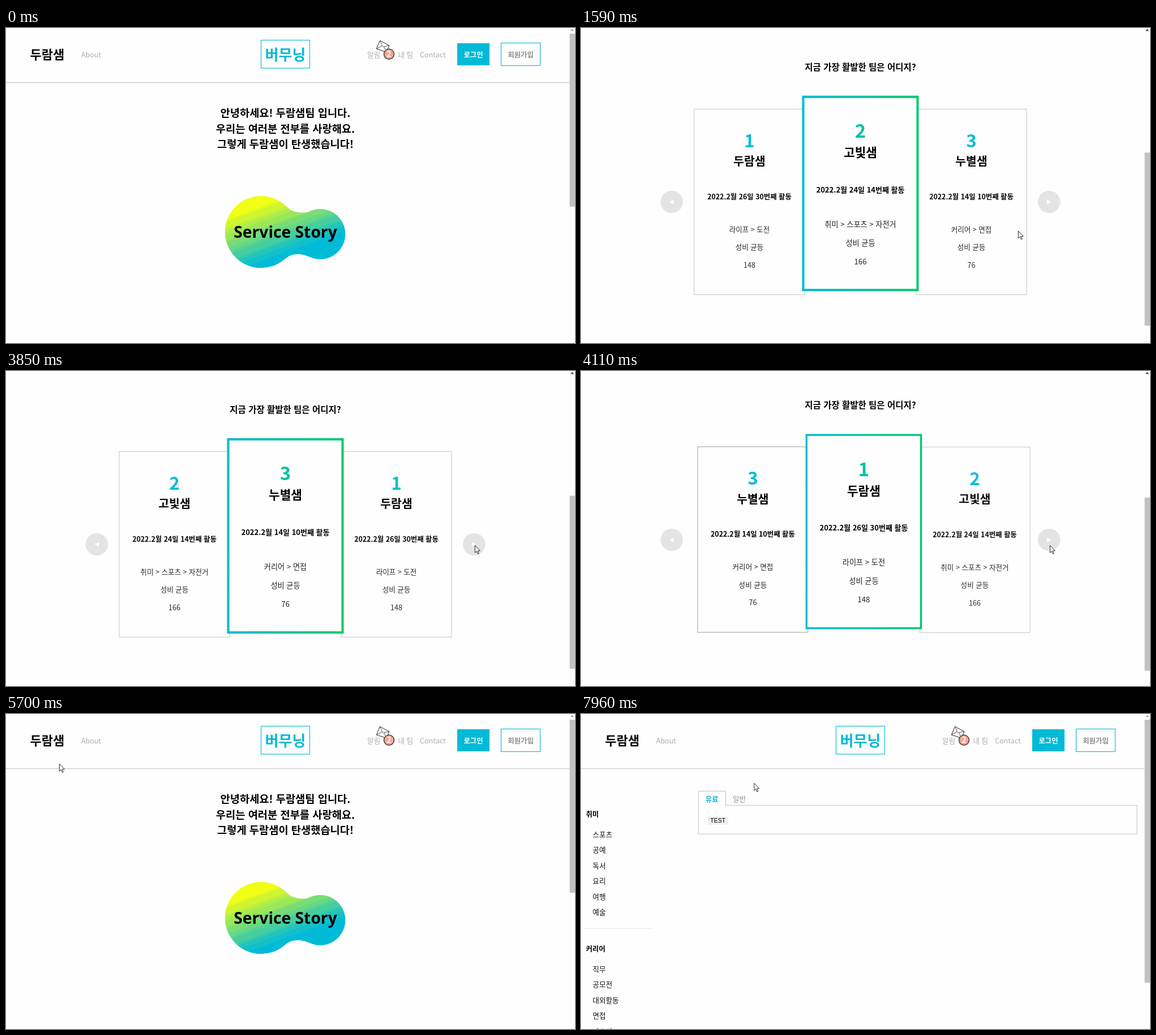
Write an HTML page that moves like this. It is 1005 by 557 pixels and loops after 8 s.

```html
<!DOCTYPE html>
<html lang="ko">
<head>
<meta charset="utf-8">
<title>Team service</title>
<style>
  html, body { margin: 0; width: 100%; height: 100%; overflow: hidden; background: #fefefe; }
  svg { display: block; width: 100%; height: 100%; }
  text { font-family: "Noto Sans CJK KR", "Noto Sans CJK JP", "Noto Sans CJK", sans-serif; white-space: pre; }
  .b { font-weight: 700; }
  .story { font-family: "Noto Sans", "Open Sans", sans-serif; font-weight: 700; }
  .chip { font-family: "Liberation Sans", Arial, sans-serif; }
</style>
</head>
<body>
<svg id="stage" viewBox="0 0 1005 557" xmlns="http://www.w3.org/2000/svg"></svg>
<script>
const LOOP = 8000, STEP = 132.6;
const CYAN = '#00bad6', GREEN = '#00c96b', PAPER = '#fefefe', GREY = '#c2c2c2', MUTED = '#adadad';
const BODY = 12.56, STRONG = 12.4;
const MID = 493.5, PITCH = 196, CARD_W = 196.2, CARD_H = 329.2, CARD_Y = 830.5;

const BRAND = '두람샘', LINK = '버무닝';
const TEAMS = [
  { rank: 1, name: BRAND, date: '2022.2월 26일 30번째 활동', topic: '라이프 > 도전', score: 148 },
  { rank: 2, name: '고빛샘', date: '2022.2월 24일 14번째 활동', topic: '취미 > 스포츠 > 자전거', score: 166 },
  { rank: 3, name: '누별샘', date: '2022.2월 14일 10번째 활동', topic: '커리어 > 면접', score: 76 }
];

// Each move runs from one time to another and ends at the given value.
const SCROLLS = [[800, 1190, 131], [1330, 1590, 523], [3780, 4100, 532], [4293, 4640, 262], [4780, 5300, 0]];
const SLIDES = [2585.5, 3877], SLIDE_TIME = 300;
const APPEAR = 390, OPEN_LIST = 7550;
const POINTER_START = [791, 369];
const POINTER = [
  [398, 930, 772, 358.5], [1860, 1985, 773, 355], [1990, 2250, 804, 299], [2250, 2515, 828, 308],
  [4780, 5300, 332, 230], [5300, 5700, 94, 88], [5700, 5960, 81, 60],
  [6100, 6880, 477, 107], [7030, 7410, 504, 29], [7430, 7550, 504, 38], [7830, 7950, 305.5, 122]
];
const HAND = [[2500, 3840], [5960, 6230], [7290, 7950]];

const clamp = v => Math.min(1, Math.max(0, v));
const linear = u => u;
const smooth = u => u * u * (3 - 2 * u);

function ease(u) {
  const curve = (s, a, b) => 3 * (1 - s) ** 2 * s * a + 3 * (1 - s) * s * s * b + s ** 3;
  let lo = 0, hi = 1;
  for (let i = 0; i < 24; i++) {
    const s = (lo + hi) / 2;
    if (curve(s, .25, .25) < u) lo = s; else hi = s;
  }
  return curve(lo, .1, 1);
}

const follow = (moves, start, t, easing) => moves.reduce((now, [from, to, ...end]) => {
  const k = easing(clamp((t - from) / (to - from)));
  return now.map((v, i) => v + (end[i] - v) * k);
}, start);

// Text is placed by the middle of its letters.
const text = (str, x, cy, size, { fill = '#000', anchor = 'middle', cls = '' } = {}) =>
  `<text x="${x}" y="${(cy + size * .37).toFixed(2)}" font-size="${size}" fill="${fill}" text-anchor="${anchor}" class="${cls}">${
    String(str).replace(/>/g, '&gt;')}</text>`;
const box = (x, y, w, h, fill, stroke = 'none', sw = 1) =>
  `<rect x="${x}" y="${y}" width="${w}" height="${h}" fill="${fill}" stroke="${stroke}" stroke-width="${sw}"/>`;
const left = (fill, cls = '') => ({ fill, cls, anchor: 'start' });

function bandStops(count) {
  const from = [240, 255, 20], to = [0, 187, 216];
  let out = '';
  for (let i = 0; i < count; i++) {
    const k = i / (count - 1);
    const rgb = from.map((c, j) => Math.round(c + (to[j] - c) * k));
    const edge = n => clamp((n + .32 * Math.sin(n * 2.4)) / count);
    out += [i, i + 1].map(n => `<stop offset="${edge(n).toFixed(3)}" stop-color="rgb(${rgb})"/>`).join('');
  }
  return out;
}

const defs = `<defs>
  <linearGradient id="bands" gradientUnits="userSpaceOnUse" x1="443" y1="311" x2="478" y2="407">${bandStops(15)}</linearGradient>
  <linearGradient id="edge" gradientUnits="userSpaceOnUse" x1="-98" y1="0" x2="98" y2="0">
    <stop offset="0" stop-color="${CYAN}"/><stop offset="1" stop-color="${GREEN}"/>
  </linearGradient>
</defs>`;

const header = `<g>
  ${text(BRAND, 42.5, 47, 22, left('#000', 'b'))}
  ${text('About', 132.7, 47.3, BODY, left(MUTED))}
  ${box(450.5, 21.5, 86, 49.5, PAPER, CYAN, 1.1)}
  ${text(LINK, MID, 47.5, 26, { fill: CYAN, cls: 'b' })}
  ${text('알림', 638, 47, BODY, left(MUTED))}
  <g stroke="#222" stroke-width="1" stroke-linejoin="round" fill="#fff">
    <path d="M660.5 22.3L677 31 671.5 42.5 654.3 36.8Z"/>
    <path d="M660.5 22.3L665.5 33.2 677 31M654.3 36.8L664 31.5M671.5 42.5L668 33" fill="none" stroke-width=".8"/>
    <path d="M664 31.5L668.5 32.5 666.5 35.5Z" fill="#f7a08f" stroke="none"/>
    <circle cx="676.5" cy="46.2" r="9" fill="#f8a394" stroke-width="1.2"/>
  </g>
  ${text(2, 676.5, 46.3, 14, { fill: '#fff', cls: 'b' })}
  ${text('내 팀', 692.5, 47, BODY, left(MUTED))}
  ${text('Contact', 731, 47.3, BODY, left(MUTED))}
  ${box(797, 27, 57, 39, CYAN)}
  ${text('로그인', 825.5, 47, STRONG, { fill: '#fff', cls: 'b' })}
  ${box(874.5, 26.5, 69, 40, PAPER, CYAN, 1.1)}
  ${text('회원가입', 909, 47, STRONG, { fill: '#8c8c8c', cls: 'b' })}
  ${box(0, 95.7, 995, 1.6, '#d0d0d0')}
</g>`;

const intro = [`안녕하세요! ${BRAND}팀 입니다.`, '우리는 여러분 전부를 사랑해요.', `그렇게 ${BRAND}이 탄생했습니다!`]
  .map((line, i) => text(line, MID, 150.5 + i * 27.5, 18.7, { cls: 'b' })).join('');

const blob = `<path fill="url(#bands)" d="M496 316C503 323 511 326.5 523 326.5S533 325 540 322.5
  A44.5 44.5 0 1 1 538 405.6C531 402.7 525 400 515 400S498 404 492 409A63.7 63.7 0 1 1 496 316Z"/>
  <text x="${MID}" y="371" font-size="28.26" text-anchor="middle" class="story">Service Story</text>`;

const card = team => `<g class="card"><rect fill="${PAPER}"/><g>
  ${text(team.rank, 0, -108.5, 31.4, { cls: 'b rank', fill: CYAN })}
  ${text(team.name, 0, -72, 20.4, { cls: 'b' })}
  ${text(team.date, 0, -9.5, STRONG, { cls: 'b' })}
  ${[team.topic, '성비 균등', team.score].map((s, i) => text(s, 0, 48.5 + i * 31.5, BODY, { fill: '#222' })).join('')}
</g></g>`;

const arrow = (x, dir) => `<g transform="translate(${x} ${CARD_Y})">
  <circle r="19.8" fill="#e4e4e4"/><path d="M${4 * dir} 0L${-3.7 * dir} -4V4Z" fill="#fff"/></g>`;

const home = `<g id="home">${intro}${blob}
  ${text('지금 가장 활발한 팀은 어디지?', MID, 592.3, 15.5, { cls: 'b' })}
  <g id="cards">${[0, 1, 2, 3, 4].map(i => card(TEAMS[i % 3])).join('')}</g>
  ${arrow(160.3, -1)}${arrow(826.8, 1)}</g>`;

const menu = (title, cy, items) => text(title, 8.7, cy, STRONG, left('#000', 'b')) +
  items.map((s, i) => text(s, 20.6, cy + 36 + i * 27.5, BODY, left('#111'))).join('');

const list = `<g id="list">
  ${menu('취미', 177.3, ['스포츠', '공예', '독서', '요리', '여행', '예술'])}
  ${box(5, 378.6, 123, 1, '#e4e4e4')}
  ${menu('커리어', 415, ['직무', '공모전', '대외활동', '면접', '자소서'])}
  ${box(207.5, 161.5, 774.5, 50.7, PAPER, GREY)}
  <path d="M207.5 162V136.5H255.5V161.5" fill="${PAPER}" stroke="${GREY}"/>
  ${box(208, 160.5, 47, 2, PAPER)}
  ${text('유료', 231.3, 150.5, BODY, { fill: CYAN, cls: 'b' })}
  ${text('일반', 279.5, 150, BODY, { fill: '#8c8c8c' })}
  ${box(223.5, 181.5, 36.5, 14, '#efefef')}
  <text x="241.7" y="192.2" font-size="10.47" text-anchor="middle" class="chip">TEST</text>
</g>`;

const bar = `<g>${box(995, 0, 10, 557, '#fcfcfc')}
  <path id="up" d="M997 5.2L1000.2 1.8 1003.4 5.2Z"/>
  <rect id="thumb" x="995.5" width="9.5" fill="#c1c1c1"/></g>`;

const pointer = `<g id="pointer" fill="#fff" stroke="#111" stroke-width=".9" stroke-linejoin="round">
  <path id="tip" d="M.4 .4V13.4L3.3 10.7 5.4 15.4 7.3 14.6 5.2 9.9H9.4Z"/>
  <path id="hand" d="M-1.5 1.2Q0 -.8 1.5 1.2V6.5Q3.2 5.6 4 7Q5.8 6.3 6.2 7.8Q8 7.3 8 9V13Q8 15 6.5 17.5V19H-.5V17.3
    Q-3 14.5 -5 11.3Q-5 9.3 -3 9.8L-1.5 11.2ZM1.5 6.5V9.5M4 7V10M6.2 7.8V10.5"/></g>`;

const $ = id => document.getElementById(id);
$('stage').innerHTML = `${defs}${box(0, 0, 1005, 557, PAPER)}<g id="page">${header}${home}${list}</g>${bar}${pointer}`;
const cards = [...$('cards').children];

const set = (el, attrs) => { for (const k in attrs) el.setAttribute(k, attrs[k]); };
const show = (el, on) => set(el, { display: on ? 'inline' : 'none' });

function drawCards(t) {
  const runs = SLIDES.map(start => clamp((t - start) / SLIDE_TIME));
  const pos = runs.reduce((sum, u) => sum + ease(u), 1);
  const borderPos = runs.reduce((sum, u) => sum + u, 1);
  const active = 1 + SLIDES.filter(start => t >= start).length;
  cards.forEach((el, i) => {
    const dist = i - pos, focus = clamp(1 - Math.abs(dist));
    const line = 1 + 2.9 * clamp(1 - Math.abs(i - borderPos));
    const paint = i === active ? 'url(#edge)' : null;
    const [frame, content] = el.children;
    set(el, {
      transform: `translate(${MID + PITCH * dist} ${CARD_Y - 15 * focus}) scale(${1 + .05 * focus})`,
      opacity: clamp(1.97 - Math.abs(dist))
    });
    set(frame, {
      x: (line - CARD_W) / 2, y: (line - CARD_H) / 2, width: CARD_W - line, height: CARD_H - line,
      'stroke-width': line, stroke: paint || GREY
    });
    set(content, { transform: `translate(0 ${3.4 * focus})` });
    set(content.querySelector('.rank'), { fill: paint || CYAN });
  });
  // The active card lies above its neighbours.
  if ($('cards').lastChild !== cards[active]) {
    $('cards').append(...cards.filter((el, i) => i !== active), cards[active]);
  }
}

function draw(t) {
  const [scroll] = follow(SCROLLS, [0], t, smooth);
  const [x, y] = follow(POINTER, POINTER_START, t, linear);
  const hand = HAND.some(([a, b]) => t >= a && t < b), listed = t >= OPEN_LIST;
  set($('page'), { transform: `translate(0 ${-scroll})` });
  show($('home'), !listed);
  show($('list'), listed);
  drawCards(t);
  set($('thumb'), { y: 10 + scroll * .402, height: listed ? 465 : 306 });
  set($('up'), { fill: scroll ? '#404040' : '#a3a3a3' });
  set($('pointer'), { transform: `translate(${x} ${y})` });
  show($('pointer'), t >= APPEAR);
  show($('tip'), !hand);
  show($('hand'), hand);
}

const start = performance.now();
function tick() {
  const t = (performance.now() - start) % LOOP;
  draw(Math.floor((t + 10) / STEP) * STEP);  // the picture advances in even steps
  requestAnimationFrame(tick);
}
tick();
</script>
</body>
</html>
```
